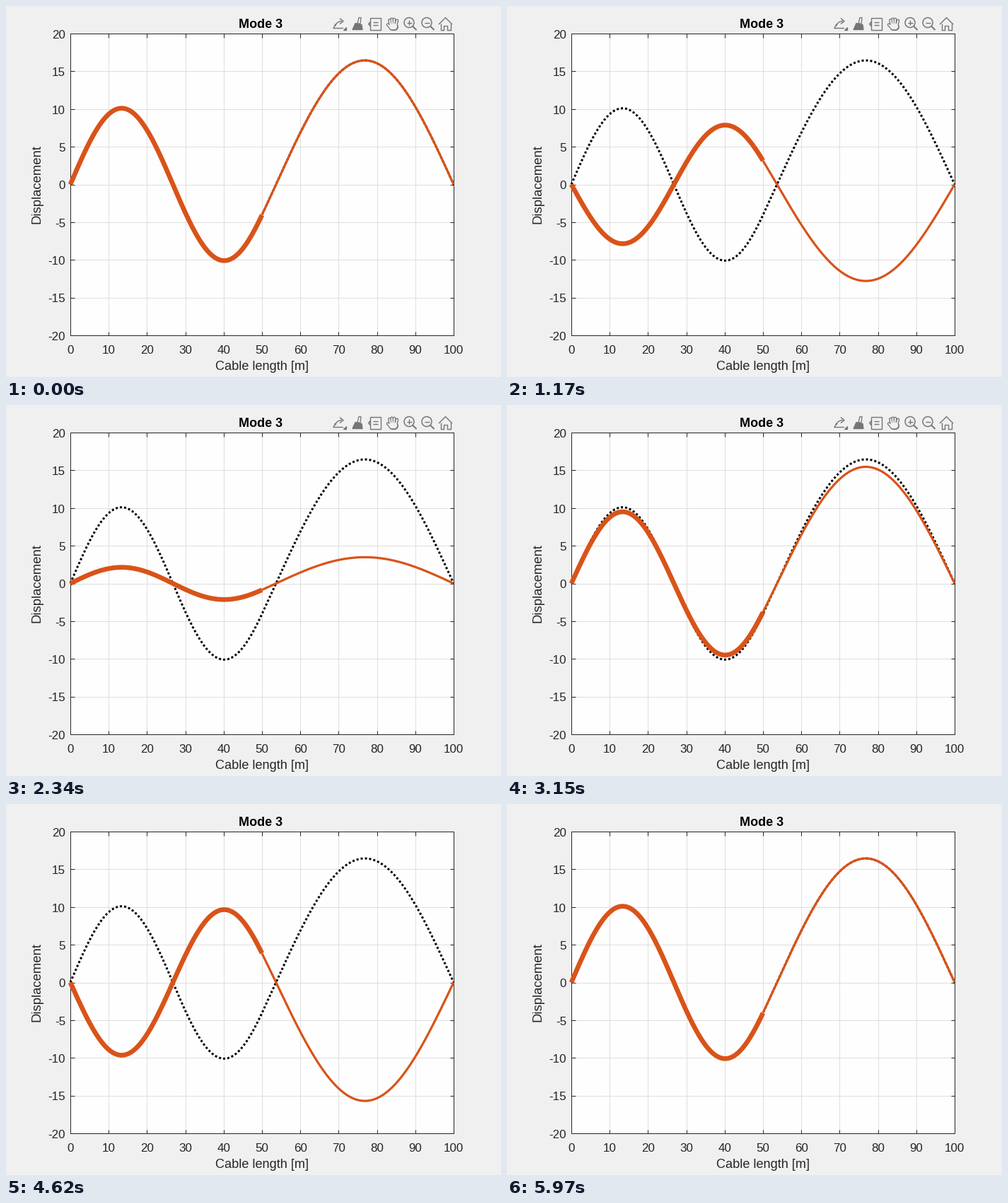
A matplotlib script for the animation above (6 s loop, 700 px wide and 525 px high).

```python
import numpy as np
import matplotlib.pyplot as plt
from matplotlib.animation import FuncAnimation
from matplotlib.patches import Arc, Circle, Polygon, Rectangle

W, H, DPI = 700, 525, 100
FRAMES, STEP = 200, 30
TOOLS_END = 154          # toolbar disappears here
PX = 72 / DPI            # one pixel in points
BACK, INK, ORANGE, GREY = "#f0f0f0", "#262626", "#d95319", "#757575"
LEFT, RIGHT, TOP, BOTTOM = 91, 633, 39, 466

plt.rcParams["font.family"] = "Liberation Sans"
fig = plt.figure(figsize=(W / DPI, H / DPI), dpi=DPI, facecolor=BACK)


def pixel_axes():
    ax = fig.add_axes([0, 0, 1, 1])
    ax.set_xlim(0, W)
    ax.set_ylim(H, 0)
    ax.axis("off")
    return ax


# Plot area
ax = fig.add_axes([LEFT / W, 1 - BOTTOM / H, (RIGHT - LEFT) / W, (BOTTOM - TOP) / H],
                  facecolor="#fefefe")
ax.set_xlim(0, 100)
ax.set_ylim(-20, 20)
ax.set_xticks(range(0, 101, 10))
ax.set_yticks(range(-20, 21, 5))
ax.set_axisbelow(True)
ax.grid(color="#dedede", lw=PX)
ax.tick_params(direction="in", length=5.5 * PX, width=PX, color=INK, top=True,
               right=True, labelbottom=False, labelleft=False)
for spine in ax.spines.values():
    spine.set(color=INK, linewidth=PX)

# Labels, placed by baseline in pixels
page = pixel_axes()


def label(x, y, text, size, ha="center", **kw):
    page.text(x, y, text, fontsize=size * PX, ha=ha, va="baseline",
              **{"color": INK, **kw})


for v in range(0, 101, 10):
    label(LEFT + v * (RIGHT - LEFT) / 100, 491.5, str(v), 17)
for v in range(-20, 21, 5):
    label(84, 259.3 - v * (BOTTOM - TOP) / 40, str(v), 17, ha="right")
label(362.5, 515, "Cable length [m]", 18.2)
label(49, 252, "Displacement", 18.5, rotation=90, rotation_mode="anchor")
label(360, 31, "Mode 3", 18, weight="bold", color="black")

# Toolbar icons, each drawn around its own centre
tools = pixel_axes()
MID = 25.5


def stroke(cx, *pts, lw=1.4, color=GREY, cap="butt"):
    x, y = np.transpose(pts)
    tools.plot(cx + x, MID + y, color=color, lw=lw * PX, solid_capstyle=cap)


def shape(cx, *pts, fc=GREY):
    tools.add_patch(Polygon(np.add(pts, (cx, MID)), fc=fc, ec=GREY, lw=1.3 * PX))


def export(cx):
    stroke(cx, (-6, 0), (-9, 6), (5, 6))
    tools.add_patch(Arc((cx + 3, MID + 3), 18, 14, theta1=180, theta2=270,
                        color=GREY, lw=1.4 * PX))
    stroke(cx, (0, -8), (5, -4), (0, 0))
    shape(cx, (5, 8), (9, 8), (9, 4))


def brush(cx):
    shape(cx, (0, -1), (2, -9), (5, -9), (4, 0), fc="none")
    shape(cx, (-3, -1), (6, 1), (7, 8), (-7, 8))


def data_tip(cx):
    tools.add_patch(Rectangle((cx - 7, MID - 9), 15, 17.5, fc="none", ec=GREY, lw=1.4 * PX))
    shape(cx, (-7, -3), (-9.5, 0), (-7, 3), fc=BACK)
    for y in (-3, 1):
        stroke(cx, (-3, y), (4, y))


def hand(cx):
    fingers = [((1.5 * k, 3), (2.3 * k, abs(k) - 7.5)) for k in (-2, -0.6, 0.9, 2.6)]
    for color, inset in ((GREY, 0), (BACK, 2.6)):
        for base, tip in [*fingers, ((-2, 6), (-7, 1))]:
            stroke(cx, base, tip, lw=4.6 - inset, color=color, cap="round")
        stroke(cx, (-1, 3.5), (2, 3.5), lw=11 - inset, color=color, cap="round")


def lens(cx, plus):
    tools.add_patch(Circle((cx - 1, MID - 2), 7, fc="none", ec=GREY, lw=1.5 * PX))
    stroke(cx, (4, 3), (9.5, 8.5), lw=2)
    stroke(cx, (-4.5, -2), (2.5, -2))
    if plus:
        stroke(cx, (-1, -5.5), (-1, 1.5))


def home(cx):
    stroke(cx, (-9.5, 0.5), (0, -9), (9.5, 0.5))
    for s in (-1, 1):
        stroke(cx, (7 * s, -1), (7 * s, 8.5), (2.5 * s, 8.5), (2.5 * s, 2.5), (0, 2.5))


export(472)
brush(497)
data_tip(522)
hand(547)
lens(571, True)
lens(596, False)
home(621.5)

# Standing wave on a cable whose right half is three times lighter
U = 3.3893
xl, xr = np.linspace(0, 50, 201), np.linspace(50, 100, 201)
yl = 10.1 * np.sin(np.sqrt(3) * U * xl / 50)
yr = 16.44 * np.sin(U * (100 - xr) / 50)

style = dict(clip_on=False, dash_capstyle="butt", solid_capstyle="butt")
ax.plot(np.r_[xl, xr[1:]], np.r_[yl, yr[1:]], color="black", lw=3 * PX,
        ls=(0, (1, 1)), zorder=4, **style)
heavy, = ax.plot(xl, yl, color=ORANGE, lw=6.7 * PX, zorder=5, **style)
light, = ax.plot(xr, yr, color=ORANGE, lw=3.2 * PX, zorder=6, **style)


def update(i):
    phase = np.cos(4 * np.pi * i / (FRAMES - 1))
    heavy.set_ydata(phase * yl)
    light.set_ydata(phase * yr)
    tools.set_visible(i < TOOLS_END)
    return heavy, light


anim = FuncAnimation(fig, update, frames=FRAMES, interval=STEP, repeat=True,
                     repeat_delay=0, blit=False)
plt.show()
```
